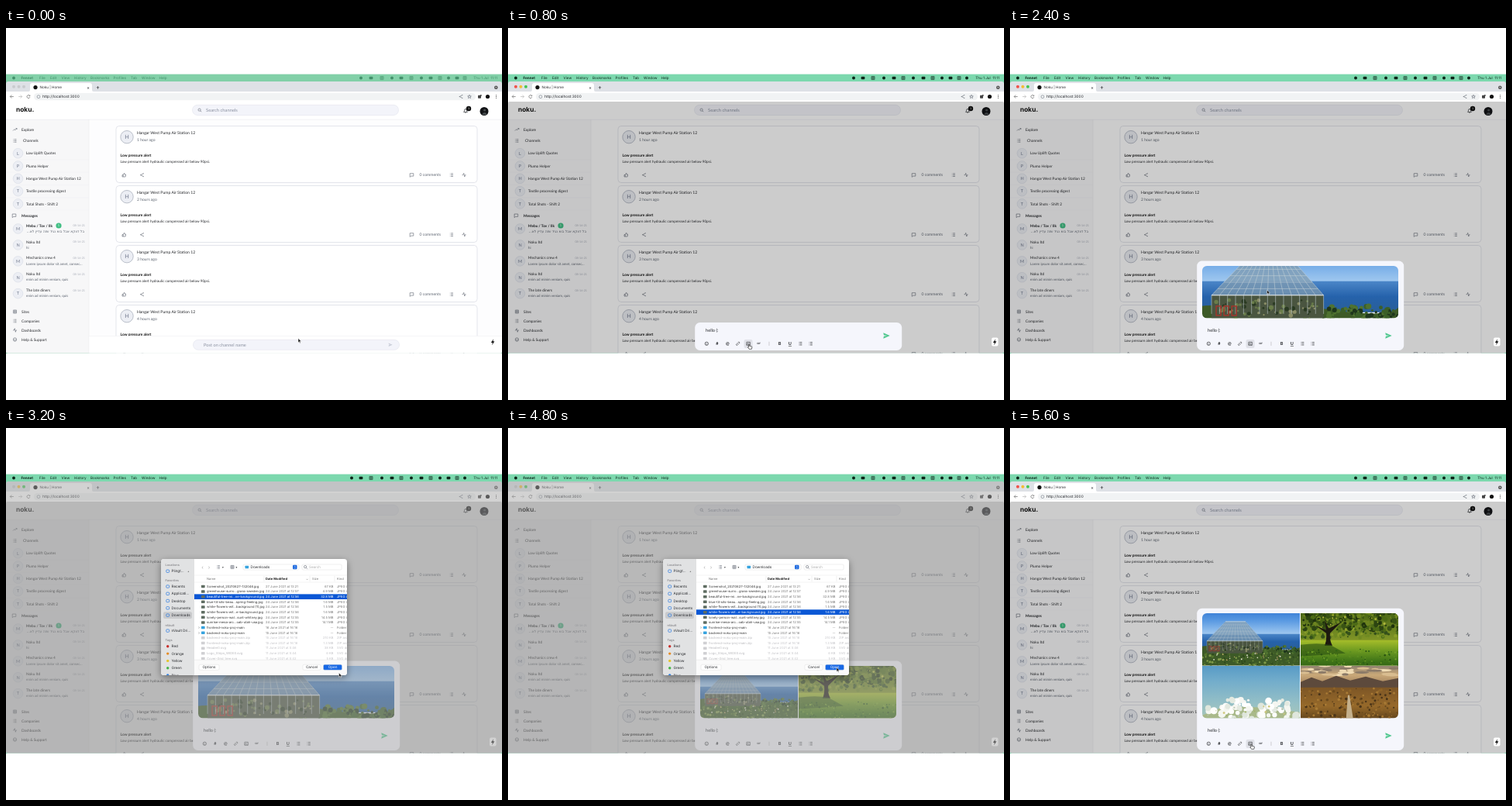
Write an HTML page that moves like this. It is 640 by 480 pixels and loops after 6400 ms.

```html
<!DOCTYPE html>
<html lang="en">
<head>
<meta charset="utf-8">
<title>Channel post with pictures</title>
<style>
  html, body { margin: 0; width: 100%; height: 100%; overflow: hidden; background: #fff; }
  svg { display: block; }
  text { font-family: Lato, sans-serif; text-rendering: geometricPrecision; white-space: pre; }
  .ui text { font-family: Inter, sans-serif; }
</style>
</head>
<body>
<svg id="stage" width="640" height="480" viewBox="0 0 640 480"></svg>
<script>
const STEP = 800;
const INK = '#25272b', GREY = '#5d6470';

// Drawing helpers; text y is the vertical middle of the line.
const text = (x, y, s, size = 5, fill = INK, extra = '') =>
  `<text x="${x}" y="${y + size * 0.34}" font-size="${size}" fill="${fill}" ${extra}>${s}</text>`;
const bold = 'font-weight="700"', end = 'text-anchor="end"', middle = 'text-anchor="middle"';
const rect = (x, y, w, h, fill, r = 0, extra = '') =>
  `<rect x="${x}" y="${y}" width="${w}" height="${h}" rx="${r}" fill="${fill}" ${extra}/>`;
const circle = (x, y, r, fill, extra = '') => `<circle cx="${x}" cy="${y}" r="${r}" fill="${fill}" ${extra}/>`;
const path = (d, fill, extra = '') => `<path d="${d}" fill="${fill}" ${extra}/>`;
const line = (d, stroke, w = 0.5) => path(d, 'none', `stroke="${stroke}" stroke-width="${w}"`);
const outline = (color, w = 0.5) => `stroke="${color}" stroke-width="${w}"`;
const range = (n, f) => Array.from({ length: n }, (_, i) => f(i)).join('');
const lerp = (a, b, t) => a + (b - a) * t;

const ICONS = {
  trend: 'M-2.5 1.5L-.7-.3L.5.7L2.5-1.5M1-1.5h1.5v1.5',
  list: 'M-1-1.8h3M-1 0h3M-1 1.8h3M-2.2-1.8h.5M-2.2 0h.5M-2.2 1.8h.5',
  thumb: 'M-2.3-.2h1.2v2.5h-1.2zM-1.1 0L.2-2.5Q1.1-2.2.7-.6H2.3L1.8 2.3H-1.1',
  share: 'M1.8-1.9L-1.8 0L1.8 1.9M1.2-1.9h1.2M-2.4 0h1.2M1.2 1.9h1.2',
  bubble: 'M-2.3-2h4.6v3.4h-3l-1.6 1.2z',
  pulse: 'M-2.5 0h1.3L-.3-2.3L.8 2.3L1.4 0h1.1',
  bell: 'M-2.4 1.4Q-1.5.6-1.5-.7Q-1.4-2.6 0-2.6T1.5-.7Q1.5.6 2.4 1.4zM-.6 2.4h1.2',
  search: 'M-2-.4a1.6 1.6 0 1 0 3.2 0a1.6 1.6 0 1 0-3.2 0M.8.8L2.2 2.2',
  link: 'M-.4.4L.4-.4M-.3-1L.8-2.1Q1.6-2.4 2-1.8T1.9-.5L.9.4M.3 1L-.8 2.1Q-1.6 2.4-2 1.8T-1.9.5L-.9-.4',
  smile: 'M-2.2 0a2.2 2.2 0 1 0 4.4 0a2.2 2.2 0 1 0-4.4 0M-1.1.5Q0 1.8 1.1.5M-.8-.8v.5M.8-.8v.5',
  picture: 'M-2.2-2h4.4v4h-4.4zM-2.2 1.2L-.6-.3L1.4 2M.6-.9h.5',
  grid: 'M-2-2h4v4h-4zM0-2v4M-2 0h4',
  back: 'M2.3 0H-2M-.2-2L-2.2 0L-.2 2',
  forward: 'M-2.3 0H2M.2-2L2.2 0L.2 2',
  reload: 'M1.7-1A2 2 0 1 0 1.9.7M1.9-2v1.3H.6',
  star: 'M0-2.3L.7-.7L2.3-.6L1 .4L1.5 2.1L0 1.1L-1.5 2.1L-1 .4L-2.3-.6L-.7-.7z',
};
const icon = (name, x, y, color = GREY, w = 0.6) =>
  `<g transform="translate(${x} ${y})">${line(ICONS[name], color, w)}</g>`;
const send = (x, y, fill, size = 1) =>
  path('M-4-3.8L4.4 0L-4 3.8L-3.4.7L1 0L-3.4-.7z', fill, `transform="translate(${x} ${y}) scale(${size})"`);

function menuBar(active) {
  const ink = active ? '#0d2519' : '#43906b';
  const menus = [[43, 'File'], [57, 'Edit'], [71.5, 'View'], [88, 'History'], [109, 'Bookmarks'],
    [138.5, 'Profiles'], [161, 'Tab'], [175, 'Window'], [197.5, 'Help']];
  const tray = [446, 458, 471, 485, 498, 510, 523, 536, 548, 560, 571, 582, 592];
  return rect(0, 59.6, 640, 360.4, active ? '#7cd8ae' : '#82d0a8')
    + circle(10, 64.5, 1.9, ink) + text(19.5, 64.5, 'Fennet', 4.6, ink, bold)
    + menus.map(([x, s]) => text(x, 64.5, s, 4.6, ink)).join('')
    + tray.slice(active ? 0 : 1).map((x, i) => i % 3 == 1
      ? rect(x - 2.4, 62.8, 4.8, 3.4, ink, 1)
      : i % 3 ? icon('grid', x, 64.5, ink) : circle(x, 64.5, 2, ink)).join('')
    + text(634, 64.5, 'Thu 1 Jul  11:11', 4.6, ink, end);
}

function browser(lights) {
  return rect(0, 69, 640, 350.6, '#dee1e6', 3)
    + lights.map((c, i) => circle(10 + i * 6.5, 75.7, 2, c)).join('')
    + path('M29 82Q31 82 31 80V74Q31 71 34 71H108Q111 71 111 74V80Q111 82 113 82z', '#fff')
    + circle(38, 76.6, 2.6, '#111') + text(43.5, 76.8, 'Noku | Home', 4.6)
    + text(106, 76.7, '×', 5.5, INK, middle) + text(118.5, 76.7, '+', 7.5, INK, middle)
    + circle(632.3, 76.7, 2.3, '#555') + path('M631.3 76.2h2l-1 1.3z', '#fff')
    + rect(0, 82, 640, 13, '#fff')
    + icon('back', 7.5, 88.5, '#555') + icon('forward', 18.5, 88.5, '#aaa') + icon('reload', 29, 88.5, '#555')
    + rect(36, 84, 570, 9.3, '#f1f3f4', 4.6)
    + circle(42, 88.7, 1.9, 'none', outline(GREY)) + text(47, 88.7, 'http://localhost:3000', 4.8)
    + icon('share', 587, 88.5) + icon('star', 598, 88.5)
    + rect(609, 86.8, 4, 4, '#444', 0.7) + circle(612.8, 87, 1, '#444')
    + circle(621.5, 88.5, 2.6, '#111') + range(3, i => circle(632.5, 86.7 + i * 1.8, 0.55, '#444'));
}

const initial = (x, y, r, s, ring = '#dfe2ea') => circle(x, y, r, '#eceef4', outline(ring, 0.9))
  + text(x, y, s[0], r * 0.88, '#70788c', middle);

function sidebar() {
  const channels = ['Low Uplift Quotes', 'Plumo Helper', 'Hangar West Pump Air Station 12',
    'Textile processing digest', 'Total Shots - Shift 2'];
  const messages = [['Mebu / Tov / Ilk', ''], ['Noku ltd', 'hi'],
    ['Mechanics crew 4', 'Lorem ipsum dolor sit amet, consec...'],
    ['Noku ltd', 'enim ad minim veniam, quis'], ['The late diners', 'enim ad minim veniam, quis']];
  const links = ['Sites', 'Companies', 'Dashboards', 'Help &amp; Support'];
  return rect(0, 118, 107, 301, '#f7f7f8') + line('M107 118V420', '#e4e5e9')
    + icon('trend', 11.5, 131) + text(20, 131, 'Explore', 4.9)
    + icon('list', 11.5, 145.5) + text(22, 145.5, 'Channels', 4.9)
    + channels.map((s, i) => {
      const y = 161.7 + i * 16.3;
      return line(`M0 ${y + 8.2}H107`, '#eeeff2') + initial(15.5, y, 6.3, s) + text(26, y, s, 4.8);
    }).join('')
    + icon('bubble', 10.5, 242) + text(20, 242, 'Messages', 4.8, INK, bold)
    + messages.map(([name, note], i) => {
      const y = 259 + i * 20.9;
      return initial(15.5, y, 6.3, name) + text(26, y - 4, name, 4.8, INK, i ? '' : bold)
        + text(26, y + 3.2, note, 4.5, GREY) + text(102, y - 4, '08-16-21', 3.7, '#a9adb8', end);
    }).join('')
    + text(101, 262.3, 'בל דווקא אבל בוא נגיד שזה עדיין לא...', 4.5, GREY, 'direction="rtl" style="font-family:DejaVu Sans,sans-serif"')
    + circle(68, 255, 3.6, '#42bf84') + text(68, 255, '1', 4, '#fff', middle)
    + links.map((s, i) => icon(['grid', 'list', 'pulse', 'smile'][i], 11.5, 366 + i * 12) + text(20, 366 + i * 12, s, 4.8)).join('');
}

function card(i) {
  const y = 126.5 + i * 77;
  return rect(142, y, 466, 73, '#fff', 4, outline('#d9dce4', 0.7))
    + initial(156, y + 14.2, 8.2, 'H', '#b4b9c5')
    + text(169, y + 9, 'Hangar West Pump Air Station 12', 5.1)
    + text(169, y + 17.5, `${i + 1} hour${i ? 's' : ''} ago`, 5, GREY)
    + text(147.5, y + 38, 'Low pressure alert', 4.9, '#111', bold)
    + text(147.5, y + 46.3, 'Low pressure alert hydraulic compressed air below 90psi.', 4.65)
    + icon('thumb', 152.3, y + 63.2) + icon('share', 175.5, y + 63.2)
    + icon('bubble', 523.5, y + 63.2) + text(533.5, y + 63, '0 comments', 5.1, GREY)
    + icon('list', 575, y + 63.2) + icon('pulse', 591, y + 63.2);
}

function page(dimmed) {
  const postBar = rect(107.5, 397.5, 532, 22, '#fff') + line('M107 397.5H640', '#ececf0')
    + rect(241.5, 402.3, 266, 13, '#f3f4fa', 6.5, outline('#dcdfe8'))
    + text(255, 408.7, 'Post on channel name', 5.7, '#8a90a0') + send(496, 408.7, '#c9cdd8', 0.6);
  return rect(0, 95, 640, 324.6, '#fdfdfe', 2)
    + `<g clip-path="url(#view)">${range(4, card)}</g>${sidebar()}`
    + rect(0, 95, 640, 23, '#fff') + line('M0 118.2H640', '#e4e5e9')
    + text(13, 105.5, 'noku.', 8.4, '#111', 'font-weight="700" style="font-family:Inter,sans-serif"')
    + rect(240.5, 99.3, 266, 13.2, '#f3f4fa', 6.6, outline('#dcdfe8'))
    + icon('search', 250, 106) + text(258, 106, 'Search channels', 5.8, '#8a90a0')
    + icon('bell', 593, 107, INK, 0.7) + circle(597, 104, 3.2, '#111') + text(597, 104, '1', 3.6, '#fff', middle)
    + circle(617, 107.5, 5.5, '#121316') + path('M614.5 112Q615 109 617.5 109T620.5 112zM616 106a1.6 1.6 0 1 1 3.2 0a1.6 1.6 0 1 1-3.2 0', '#454a4d')
    + (dimmed ? rect(0, 95, 640, 324.6, '#000', 2, 'opacity=".2"') : postBar)
    + rect(624, 399.5, 8.5, 11, '#fff', 2) + path('M629-3.6L625.8 1.1H627.8L627.2 4.4L630.3-.6H628.3z', '#111', 'transform="translate(0 404.8)"');
}

// Photographs reduced to simple tones, each 126 x 84.
let seed = 1;
const random = () => (seed = seed * 16807 % 2147483647) / 2147483647;
const scatter = (n, x, y, w, h, r, colors) => range(n, i =>
  circle((x + random() * w).toFixed(1), (y + random() * h).toFixed(1), (r * (0.5 + random())).toFixed(1), colors[i % colors.length]));
const backdrop = (id, y = 0, h = 84) => rect(0, y, 126, h, `url(#${id})`);

function greenhouse() {
  const panes = range(15, i => {
    const t = i / 14;
    return `M${lerp(30, 56, t)} 19L${lerp(6, 78, t)} 44V56`;
  }) + range(7, j => {
    const t = j / 6;
    return `M${lerp(30, 6, t)} ${lerp(19, 44, t)}H${lerp(56, 78, t)}`;
  });
  return backdrop('sky', 0, 36) + backdrop('sea', 35, 20)
    + path('M0 51Q40 47 80 53T126 52V84H0z', '#3d5a27')
    + path('M30 19H56L78 44H6z', '#7f9bb0', 'opacity=".75"')
    + path('M6 44H78V60H6z', '#4a5540')
    + scatter(60, 9, 47, 66, 10, 1, ['#6a7d4a', '#2a3a22', '#8a8d66'])
    + line(panes, '#c3ced4', 0.28) + line('M6 44H78M30 19H56', '#dfe6ea', 0.5)
    + range(3, i => rect(9 + i * 5, 51, 3, 6, 'none', 0, outline('#a5342a', 0.7)))
    + scatter(190, 0, 59, 126, 24, 1.2, ['#54752c', '#7f9a48', '#2f4a1d', '#46652a'])
    + scatter(70, 78, 51, 48, 9, 1.3, ['#1f361c', '#3b5f28', '#4f7230'])
    + scatter(30, 5, 60, 110, 9, 0.6, ['#e8e5d4', '#cfae74']);
}

function oak() {
  return backdrop('meadow')
    + scatter(110, 0, 26, 126, 14, 1.7, ['#4e6f1a', '#8b9f2a', '#34501a', '#6f8a22'])
    + backdrop('lawn', 43, 41)
    + scatter(260, 0, 2, 126, 28, 2.2, ['#2c4411', '#4c6a16', '#20330d', '#6d8520', '#395314'])
    + scatter(30, 10, 10, 100, 20, 1, ['#b3b83e', '#94a52c'])
    + path('M31 50Q34 43 33 34L19 24L33 30L31 16L36 28L52 20L38 34Q37 43 41 50z', '#1d190f')
    + path('M0 49Q22 46 38 49L58 60L0 64z', '#274d12', 'opacity=".6"')
    + scatter(170, 0, 54, 126, 28, 0.8, ['#5c8f20', '#2f6415', '#79a52a', '#274f12']);
}

function blossom() {
  return backdrop('haze') + '<g filter="url(#soft)">'
    + path('M0 84V72L30 60L80 62L126 68V84z', '#a9b98a')
    + scatter(60, 4, 60, 118, 24, 3.4, ['#f4f6f0', '#dfe6dc', '#fdfdfb'])
    + scatter(20, 32, 50, 30, 16, 3, ['#f5f6f1', '#fff', '#e3e9e0'])
    + scatter(16, 84, 52, 28, 14, 3, ['#f5f6f1', '#fff', '#e3e9e0'])
    + scatter(30, 5, 60, 116, 22, 1, ['#cfc77a', '#a3b36a', '#b9c6b4']) + '</g>';
}

function valley() {
  return backdrop('dusk', 0, 40) + '<g filter="url(#soft)">'
    + range(34, i => `<ellipse cx="${random() * 126}" cy="${8 + random() * 13}" rx="${4 + random() * 7}" ry="1.6" fill="${['#d9bd90', '#f0dcb4', '#8b7a68'][i % 3]}"/>`)
    + '</g>' + path('M0 29L14 23L28 28L46 21L64 27L84 22L106 28L126 24V50H0z', '#5d4a3c')
    + backdrop('field', 36, 48)
    + scatter(230, 0, 37, 126, 46, 1.2, ['#8f6428', '#4a3418', '#6a4a1e', '#a97b35'])
    + path('M61 46H63L69 84H58z', '#c4b08c');
}

const PHOTOS = [greenhouse, oak, blossom, valley].map(draw => draw());
const photo = (i, x, y, w) =>
  `<svg x="${x}" y="${y}" width="${w}" height="67.5" viewBox="0 0 126 84" preserveAspectRatio="xMidYMid slice">${PHOTOS[i]}</svg>`;

function composer(count, hover) {
  const rows = Math.ceil(count / 2), top = [380, 300.5, 232.8][rows], y0 = 307 - (rows - 1) * 68;
  const tools = ['smile', '#', '@', 'link', 'picture', 'GIF', '|', 'B', 'U', 'list', 'list'];
  const pictures = count == 1 ? photo(0, 248, 307, 253)
    : range(count, i => photo(i, 248 + i % 2 * 127, y0 + (i >> 1) * 68, 126));
  return rect(241.2, top, 267, 416 - top, '#f5f6fc', 6.5)
    + (count ? `<clipPath id="frame">${rect(248, y0, 253, rows * 68 - 0.5, '#000', 6)}</clipPath><g clip-path="url(#frame)">${pictures}</g>` : '')
    + text(255, 389.7, 'hello (:', 5.7) + send(488.3, 397, '#4fc78e')
    + (hover ? rect(304.5, 402, 11, 11, '#e0e1e8', 2) : '')
    + tools.map((s, i) => {
      const x = 256.3 + i * 13.45;
      return ICONS[s] ? icon(s, x, 407.3, INK) : text(x, 407.3, s, s == 'GIF' ? 3 : 5.5, s == '|' ? '#aaa' : INK,
        `${middle} ${bold} ${s == 'U' ? 'text-decoration="underline"' : ''}`);
    }).join('');
}

const FILES = [
  ['Screenshot_20210627-132046.jpg', '27 June 2021 at 13:21', '67 KB'],
  ['greenhouse-surro...grass-sweden.jpg', '24 June 2021 at 12:57', '4.9 MB'],
  ['beautiful-tree-mi...ne-background.jpg', '24 June 2021 at 12:56', '32.8 MB'],
  ['blue-tit-sits-beau...spring-feeling.jpg', '24 June 2021 at 12:56', '1.6 MB'],
  ['white-flowers-wit...background (1).jpg', '24 June 2021 at 12:56', '1.5 MB'],
  ['white-flowers-wit...e-background.jpg', '24 June 2021 at 12:56', '1.6 MB'],
  ['lonely-person-wal...sunt-whitney.jpg', '24 June 2021 at 12:55', '14.5 MB'],
  ['sunrise-mesa-arc...oab-utah-usa.jpg', '24 June 2021 at 12:55', '14.1 MB'],
  ['frontend-noku-proj-main', '16 June 2021 at 16:16', '--'],
  ['backend-noku-proj-main', '15 June 2021 at 16:16', '--'],
  ['backend-noku-proj-main.zip', '15 June 2021 at 16:16', '210 KB'],
  ['frontend-noku-proj-main.zip', '15 June 2021 at 16:16', '1.3 MB'],
  ['Header0.svg', '11 June 2021 at 5:46', '38 KB'],
  ['Logo_Strips_WIDE0.svg', '11 June 2021 at 5:44', '6 KB'],
  ['Cover-Grid_tree.svg', '11 June 2021 at 5:42', '5 KB'],
];

function dialog(selected) {
  const places = [[184.7, 'Plingt...'], [204.5, 'Recents'], [213.8, 'Applicati...'], [223, 'Desktop'],
    [232.3, 'Documents'], [241.6, 'Downloads'], [261.6, 'nVault Dri...']];
  const tags = [['Red', '#c9302c'], ['Orange', '#e58c25'], ['Yellow', '#e5c52c'], ['Green', '#45b54a'], ['Blue', '#2a7de1']];
  const fileRow = ([name, date, size], i) => {
    const y = 204.4 + i * 6.64, on = i == selected, folder = i == 8 || i == 9;
    const ink = on ? '#fff' : i > 9 ? '#b9b9bd' : '#333';
    const soft = on ? '#fff' : i > 9 ? '#c4c4c8' : '#777';
    return (on ? rect(243, y - 3.3, 197, 6.64, '#0a57d5') : '')
      + (folder ? text(248, y, '›', 5, '#777') : '')
      + rect(252, y - 1.7, 4.6, 3.5, folder ? '#36a3df' : i > 9 ? '#d0d0d3' : '#5f6d62', 0.6)
      + text(259, y, name, 4.15, ink) + text(335, y, date, 4.15, soft)
      + text(422.5, y, size, 4.15, soft, end)
      + text(427, y, folder ? 'Folder' : i < 8 ? 'JPEG im' : i < 12 ? 'ZIP arch' : 'SVG do', 4.15, soft);
  };
  const button = (x, w, s, fill, ink) => rect(x, 305.3, w, 7, fill, 1.6, outline('#d4d4d4', 0.4)) + text(x + w / 2, 308.8, s, 4.6, ink, middle);
  return rect(200, 169, 240, 150, '#fff', 4, 'filter="url(#shadow)"')
    + `<g clip-path="url(#sheet)">` + rect(200, 169, 43, 150, '#e1e2e3')
    + [[177, 'Locations'], [197, 'Favorites'], [254.3, 'nVault'], [274, 'Tags']].map(([y, s]) => text(205.5, y, s, 3.9, '#8b8b8f', 'font-weight="600"')).join('')
    + rect(203, 237.3, 37, 8.6, '#c9cacc', 2)
    + places.map(([y, s]) => rect(206.8, y - 1.7, 3.8, 3.4, 'none', 0.8, outline('#2878e0', 0.7)) + text(213.5, y, s, 4.6)).join('')
    + tags.map(([s, c], i) => circle(208.7, 281.8 + i * 9.3, 1.7, c) + text(213.5, 281.8 + i * 9.3, s, 4.6)).join('')
    + text(235.3, 184.6, '▴', 3.5, '#777', middle)
    + text(253.5, 179.4, '‹', 6.5, '#aaa', middle) + text(262, 179.4, '›', 6.5, '#aaa', middle)
    + icon('list', 274, 179.4) + text(279, 179.4, '▾', 3.5) + icon('grid', 292, 179.4) + text(296.5, 179.4, '▾', 3.5)
    + rect(306, 176, 72, 7, '#fff', 1.5, outline('#ddd')) + rect(308.5, 177.7, 4.6, 3.6, '#36a3df', 0.6)
    + text(315.5, 179.5, 'Downloads', 4.7) + rect(370, 176.8, 5.5, 5.5, '#1967de', 1.3) + line('M371.6 179L372.7 177.9L373.8 179M371.6 180.2L372.7 181.3L373.8 180.2', '#fff')
    + rect(382, 176, 51, 7, '#fff', 1.5, outline('#ddd')) + icon('search', 386.5, 179.5) + text(391, 179.5, 'Search', 4.5, '#aaa')
    + line('M243 190H440M243 199H440', '#e5e5e5') + line('M333 191V198M392 191V198M424 191V198', '#ddd')
    + text(259, 194.7, 'Name', 4.1, '#777') + text(335, 194.7, 'Date Modified', 4.1, '#222', bold) + text(387, 194.7, '⌄', 4, '#777')
    + text(395, 194.7, 'Size', 4.1, '#777') + text(427, 194.7, 'Kind', 4.1, '#777')
    + FILES.map(fileRow).join('')
    + rect(243, 299.2, 197, 20, '#fafafa') + line('M243 299.2H440', '#ddd')
    + button(249, 26, 'Options', '#fff', INK) + button(383, 23, 'Cancel', '#fff', INK) + button(409.5, 24, 'Open', '#1768e5', '#fff') + '</g>';
}

const arrow = (x, y) => path('M0 0V5.4L1.3 4.2L2.2 6.2L3.1 5.8L2.2 3.9H4z', '#111', `transform="translate(${x} ${y})" ${outline('#fff')}`);
const hand = (x, y) => path('M0 .3Q.7-.4 1.2.4V2.4L4 3Q4.6 3.2 4.4 4L3.8 6.3H.6L-1.2 3.8Q-1 3.2 0 3.7z', '#fff', `transform="translate(${x} ${y})" ${outline('#111', 0.6)}`);

const defs = (() => {
  const gradient = (id, ...stops) => `<linearGradient id="${id}" x2="0" y2="1">${stops.map((c, i) =>
    `<stop offset="${i / (stops.length - 1)}" stop-color="${c}"/>`).join('')}</linearGradient>`;
  return '<defs>' + gradient('sky', '#2a70d0', '#5a9ae2', '#a3caf0') + gradient('sea', '#4b86c8', '#2562ab', '#2a5f98')
    + gradient('meadow', '#3f5c14', '#7f9426', '#9fb32c') + gradient('lawn', '#a6bd2a', '#6d9a20', '#3f7418', '#2a5412')
    + gradient('haze', '#4c93c4', '#73adcb', '#94bfc6', '#b0c9b4')
    + gradient('dusk', '#6a6a6c', '#c9a878', '#8a6a4c') + gradient('field', '#7d5626', '#96692a', '#4e3617')
    + `<clipPath id="view">${rect(107, 118, 533, 301.6, '#000')}</clipPath><clipPath id="sheet">${rect(200, 169, 240, 150, '#000', 4)}</clipPath>`
    + '<filter id="soft"><feGaussianBlur stdDeviation=".7"/></filter>'
    + '<filter id="shadow" x="-20%" y="-20%" width="140%" height="150%"><feDropShadow dx="0" dy="3" stdDeviation="5" flood-opacity=".4"/></filter></defs>';
})();

const SCENES = [
  { pointer: arrow(377, 400.5) },
  { photos: 0, hover: true, pointer: hand(310.5, 408) },
  { photos: 0, file: 1, pointer: arrow(424, 308.5) },
  { photos: 1, hover: true, pointer: arrow(331.5, 338) },
  { photos: 1, file: 2, pointer: arrow(429.5, 316) },
  { photos: 2, pointer: hand(312, 404.5) },
  { photos: 2, file: 5, pointer: arrow(424, 309) },
  { photos: 4, hover: true, pointer: hand(311, 408) },
];

function draw({ photos, file, hover, pointer }) {
  const active = photos !== undefined, picking = file !== undefined;
  const lights = active ? [picking ? '#c6c8ca' : '#f0524a', '#f3bd35', '#44c553'] : ['#c9cbce', '#c9cbce', '#c9cbce'];
  return defs + `<g class="ui">${menuBar(active)}${browser(lights)}</g>` + page(active)
    + (active ? composer(photos, hover) : '')
    + (picking ? rect(0, 69, 640, 350.6, '#a5a5a5', 3, 'opacity=".5"') + `<g class="ui">${dialog(file)}</g>` : '')
    + pointer;
}

const stage = document.getElementById('stage');
let shown = -1;
function tick() {
  const step = Math.floor(performance.now() / STEP) % SCENES.length;
  if (step !== shown) stage.innerHTML = draw(SCENES[shown = step]);
  requestAnimationFrame(tick);
}
tick();
</script>
</body>
</html>
```
